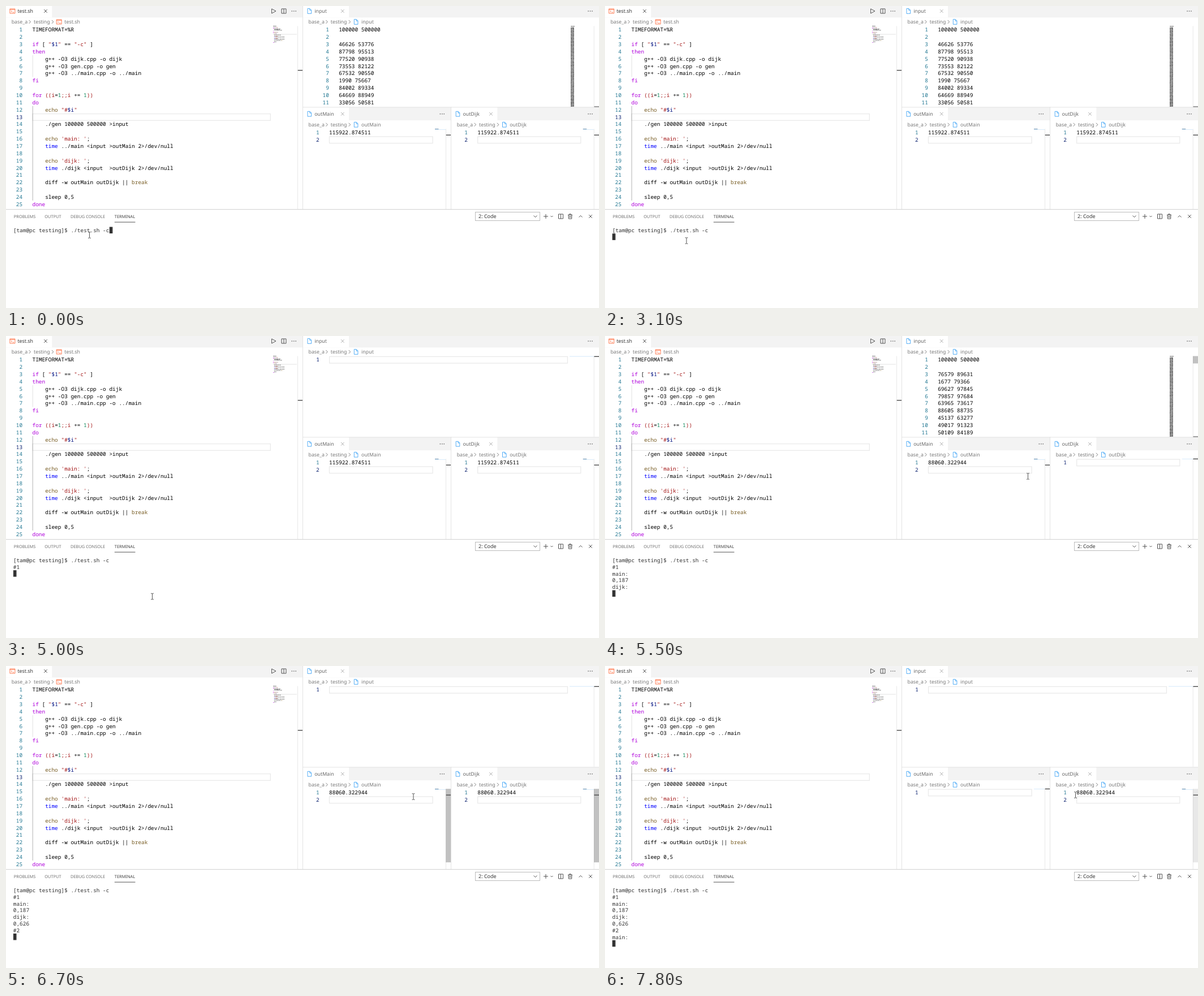
An HTML page with a canvas for the animation above (8000 ms loop, 1048 px wide and 534 px high).

```html
<!DOCTYPE html>
<html lang="en">
<head>
<meta charset="utf-8">
<title>Stress test in a code editor</title>
<style>
  html, body { margin: 0; width: 100%; height: 100%; overflow: hidden; background: #fff; }
  canvas { display: block; }
</style>
</head>
<body>
<canvas width="1048" height="534"></canvas>
<script>
const ctx = document.querySelector('canvas').getContext('2d');
const LOOP = 8000, FONT = 9.44, CHAR = FONT * 0.6, LINE = 12.855, ROW = 11.78;
const MAP_ROW = 1.2, MAP_CHAR = 0.46;

const script = `TIMEFORMAT=%R

if [ "$1" == "-c" ]
then
    g++ -O3 dijk.cpp -o dijk
    g++ -O3 gen.cpp -o gen
    g++ -O3 ../main.cpp -o ../main
fi

for ((i=1;;i += 1))
do
    echo "#$i"

    ./gen 100000 500000 >input

    echo 'main: ';
    time ../main <input >outMain 2>/dev/null

    echo 'dijk: ';
    time ./dijk <input  >outDijk 2>/dev/null

    diff -w outMain outDijk || break

    sleep 0,5
done`.split('\n');

const syntax = [
  ['\\b(?:if|then|fi|for|do|done)\\b', '#af00db'],
  ['\\b(?:echo|break)\\b', '#795e26'],
  ['\\btime\\b', '#0000ff'],
  ['\'[^\']*\'|"-c"|"#?|\\(\\(i|;;i|\\)\\)', '#a31515'],
  ['\\$\\w', '#001080'],
  ['1(?=[;)])', '#098658'],
  ['\\w+|\\s+|.', '#000']
];
const lexer = new RegExp(syntax.map(([pattern]) => `(${pattern})`).join('|'), 'g');

const graph = pairs => ['100000 500000', '', ...pairs.split(',')];
const firstGraph = graph('46626 53776,87798 95513,77520 90938,73553 82122,67532 90550,1990 75667,84002 89334,64669 88949,33056 50581');
const secondGraph = graph('76579 89631,1677 79366,69627 97845,79857 97684,63965 73617,88605 88735,45137 63277,49017 91323,50109 84189');
const empty = [''], firstSum = ['115922.874511', ''], secondSum = ['88060.322944', ''];

// Each timeline lists [start in ms, value...].
const inputFile = [[0, firstGraph], [4100, empty], [5200, secondGraph], [6700, empty]];
const mainFile = [[0, firstSum], [5200, empty], [5500, secondSum], [7400, empty]];
const dijkFile = [[0, firstSum], [5500, empty], [5900, secondSum]];
const inputSlider = [[0, 0], [5200, 0.4], [6200, 0]];
const mainSlider = [[0, 0], [5700, 0.4], [6200, 0], [6700, 0.4], [7400, 0]];
const dijkSlider = [[0, 0], [6200, 0.4], [6900, 0], [7000, 0.4], [7800, 0.15]];
const terminal = [
  [0, '[tam@pc testing]$ ./test.sh -c'], [4000, '#1'], [5200, 'main:'], [5200, '0,187'],
  [5200, 'dijk:'], [5900, '0,626'], [6600, '#2'], [7400, 'main:']
];
const pointer = [
  [0, 147.5, 405], [3100, 144, 415], [3200, 138.5, 420], [3400, 137, 423], [3500, 135, 426],
  [3600, 132, 430], [3700, 131, 433], [3800, 131.5, 436], [4000, 143, 439], [4100, 157.5, 437],
  [4300, 153, 435], [4400, 146, 432], [4500, 139.5, 429.5], [4700, 149, 436], [4800, 161.5, 443],
  [5000, 258.5, 460.5], [5200, 409.5, 457], [5500, 747.5, 248], [5700, 737, 228], [5800, 736, 215],
  [5900, 739.5, 206], [6200, 807.5, 225], [6400, 850.5, 226.5], [6600, 800, 229], [6700, 720, 231],
  [6900, 686.5, 232], [7000, 853.5, 231], [7200, 777, 230, 'arrow'], [7400, 718.5, 228],
  [7600, 815.5, 229.5], [7800, 831.5, 228]
];
const current = (timeline, t) => timeline.findLast(step => step[0] <= t);

const icons = {
  shell: 'M-4.5-4h9v8h-9z M-4.5-2.7h9 M-2.5-.8l1.6 1.4-1.6 1.4 M.3 2.2h2.4',
  file: 'M-3.2-4.4H.8l2.6 2.6v6.2h-6.6z M.6-4.2v2.6h2.6',
  close: 'M-2.8-2.8l5.6 5.6M2.8-2.8l-5.6 5.6',
  next: 'M-1.4-3l2.9 3-2.9 3',
  down: 'M-3-1.4l3 2.9 3-2.9',
  smallDown: 'M-2-1l2 2 2-2',
  up: 'M-3 1.5l3-2.9 3 2.9',
  plus: 'M-4 0h8M0-4v8',
  play: 'M-3.4-4l7.4 4-7.4 4z',
  split: 'M-4-4h8v8h-8zM0-4v8',
  trash: 'M-4-2.6h8M-1.4-2.8v-1.4h2.8v1.4M-3-2.6l.3 6.8h5.4l.3-6.8M-1-.8v3.2M1-.8v3.2',
  beam: 'M-2.4-5.3h1.8l.6.6.6-.6h1.8M0-4.7v9.4M-2.4 5.3h1.8l.6-.6.6.6h1.8'
};

function icon(name, x, y, color = '#424242', width = 0.9) {
  ctx.save();
  ctx.translate(x, y);
  ctx.strokeStyle = color;
  ctx.lineWidth = width;
  ctx.stroke(new Path2D(icons[name]));
  ctx.restore();
}

function box(x, y, w, h, color) {
  ctx.fillStyle = color;
  ctx.fillRect(x, y, w, h);
}

function text(s, x, y, color, font, align = 'left') {
  ctx.font = font;
  ctx.textAlign = align;
  ctx.fillStyle = color;
  ctx.fillText(s, x, y);
}
const mono = (s, x, y, color, align) => text(s, x, y + 3.4, color, `${FONT}px "Noto Sans Mono", monospace`, align);
const sans = (s, x, y, color, size = 8.8) => text(s, x, y + size * 0.355, color, `${size}px "Noto Sans", sans-serif`);

function dots(x, y) {
  for (const dx of [-3.4, 0, 3.4]) box(x + dx - 0.65, y - 0.6, 1.3, 1.3, '#424242');
}

function group(left, right, top, name, type) {
  const focused = type === 'shell', color = focused ? '#ff7043' : '#42a5f5';
  const tabY = top + 12, crumbY = top + 31;
  box(left, top, right - left, 23.4, '#f3f3f3');
  box(left, top, 81.3, 23.4, '#fff');
  icon(type, left + 11.4, tabY, color);
  sans(name, left + 20.4, tabY, focused ? '#333' : '#666');
  icon('close', left + 70, tabY, focused ? '#424242' : '#a8a8a8');
  dots(right - 15.5, tabY);
  sans('base_a', left + 9.7, crumbY, '#777');
  icon('next', left + 42, crumbY, '#777');
  sans('testing', left + 49, crumbY, '#777');
  icon('next', left + 82.3, crumbY, '#777');
  icon(type, left + 93.7, crumbY, color);
  sans(name, left + 103.3, crumbY, '#777');
}

function drawTokens(line, drawToken) {
  for (const match of line.matchAll(lexer)) {
    const kind = match.slice(1).findIndex(Boolean);
    drawToken(match[0], match.index, syntax[kind][1]);
  }
}

function editor({ textX, top, lines, active, boxEnd, right, markY, colored }) {
  if (active) {
    ctx.strokeStyle = '#eaeaea';
    ctx.lineWidth = 1.3;
    ctx.strokeRect(textX + 0.4, top + (active - 1) * LINE + 0.9, boxEnd - textX, LINE - 1.2);
  }
  lines.forEach((line, i) => {
    const y = top + (i + 0.5) * LINE;
    mono(i + 1, textX - 17.4, y, i + 1 === active ? '#0b216f' : '#237893', 'right');
    if (colored) drawTokens(line, (s, col, color) => mono(s, textX + col * CHAR, y, color));
    else mono(line, textX, y, '#000');
  });
  const bottom = top < 100 && right > 1000 ? 178.5 : 359;
  box(right - 9.2, top, 0.7, bottom - top, '#dedede');
}
const mark = (right, y) => box(right - 8.6, y - 0.7, 8.6, 1.4, '#4a4a4a');

function slider(right, top, height, alpha) {
  box(right - 9, top, 9, height, `rgba(100,100,100,${alpha})`);
}

function scriptEditor() {
  group(0, 524.3, -3, 'test.sh', 'shell');
  icon('play', 473, 9);
  icon('split', 491, 9);
  box(46.8, 35.5 + 4 * LINE, 0.7, 3 * LINE, '#d3d3d3');
  editor({ textX: 46.5, top: 35.5, lines: script, active: 13, boxEnd: 467, right: 524.3, colored: true });
  box(46.8, 35.5 + 11 * LINE, 0.7, 13 * LINE, '#939393');
  box(472, 49.6, 42, 0.9, '#e2e2e2');
  script.forEach((line, row) => drawTokens(line, (s, col, color) => {
    ctx.globalAlpha = 0.65;
    if (s.trim()) box(472 + col * MAP_CHAR, 35.3 + row * MAP_ROW, s.length * MAP_CHAR, 0.8, color);
    ctx.globalAlpha = 1;
  }));
  mark(524.3, 113.7);
}

function graphMap() {
  for (let row = 0; row < 119; row++) {
    if (row === 1) continue;
    for (let col = 0; col < (row ? 11 : 13); col++) {
      const noise = Math.abs(Math.sin(row * 12.9898 + col * 78.233) * 43758.5453) % 1;
      const alpha = row && col === 5 ? 0.25 : 0.45 + noise * 0.45;
      box(998 + col * 0.54, 35.4 + row * MAP_ROW, 0.54, 1.05, `rgba(0,0,0,${alpha})`);
    }
  }
}

function inputEditor(t) {
  const lines = current(inputFile, t)[1], blank = lines === empty;
  group(524.8, 1048, -3, 'input', 'file');
  editor({ textX: blank ? 571.2 : 588.2, top: 35.5, lines, active: blank ? 1 : 0, boxEnd: 992, right: 1048 });
  if (blank) box(996, 35.6, 43, 0.9, '#cfe6fa');
  else graphMap();
  slider(1048, 35.5, 13, current(inputSlider, t)[1]);
  mark(1048, blank ? 36.3 : 178.2);
}

function sumEditor(left, right, name, file, sliderTimes, t) {
  const lines = current(file, t)[1], blank = lines === empty, top = 217.2, mapX = right - 28.3;
  group(left, right, 178.8, name, 'file');
  editor({ textX: left + 46.3, top, lines, active: lines.length, boxEnd: right - 32.6, right });
  box(mapX, blank ? 217 : 218.2, 19, 0.8, '#cfe6fa');
  if (!blank) box(mapX, 217, 6.5, 0.9, '#5f87a8');
  slider(right, top, 130, current(sliderTimes, t)[1]);
  mark(right, blank ? 217.4 : 228.2);
}

function panel(t) {
  sans('PROBLEMS', 13.8, 372, '#717171', 7.44);
  sans('OUTPUT', 68.3, 372, '#717171', 7.44);
  sans('DEBUG CONSOLE', 114, 372, '#717171', 7.44);
  sans('TERMINAL', 191.8, 372, '#424242', 7.44);
  box(191.8, 381.7, 36.7, 0.9, '#424242');
  ctx.strokeStyle = '#b5b5b5';
  ctx.lineWidth = 0.9;
  ctx.strokeRect(829.5, 364.5, 114, 15);
  sans('2: Code', 835, 372, '#333', 9);
  icon('down', 935.5, 372);
  icon('plus', 954, 372);
  icon('smallDown', 964.5, 372);
  icon('split', 980.5, 372);
  icon('trash', 997, 372);
  icon('up', 1015.5, 372);
  icon('close', 1033, 372);

  const printed = terminal.filter(step => step[0] <= t);
  printed.forEach(([, line], row) => mono(line, 12.8, 396.7 + row * ROW, '#333'));
  const typing = t < 700;
  box(12.9 + (typing ? 30 * CHAR : 0), 390.6 + (typing ? 0 : printed.length) * ROW, 5.6, 11.5, '#333');
}

function drawPointer(t) {
  const [, x, y, shape] = current(pointer, t);
  if (shape !== 'arrow') return icon('beam', x, y, '#333', 0.85);
  ctx.save();
  ctx.translate(x, y);
  const arrow = new Path2D('M0 0l5.6 5.4-2.4.2 1.4 3-1.5.7-1.4-3L0 8z');
  ctx.strokeStyle = '#eee';
  ctx.lineWidth = 0.8;
  ctx.fillStyle = '#222';
  ctx.fill(arrow);
  ctx.stroke(arrow);
  ctx.restore();
}

function draw(now) {
  const t = now % LOOP;
  ctx.textRendering = 'geometricPrecision';
  box(0, 0, 1048, 534, '#fff');
  scriptEditor();
  inputEditor(t);
  sumEditor(524.8, 786.3, 'outMain', mainFile, mainSlider, t);
  sumEditor(787, 1048, 'outDijk', dijkFile, dijkSlider, t);
  box(524.2, 0, 0.8, 359.5, '#dcdcdc');
  box(524.2, 178.6, 524, 0.8, '#dcdcdc');
  box(786.2, 178.6, 0.8, 181, '#dcdcdc');
  box(0, 359.3, 1048, 0.9, '#c8c8c8');
  panel(t);
  drawPointer(t);
}

const start = performance.now();
function tick() {
  draw(performance.now() - start);
  requestAnimationFrame(tick);
}
tick();
</script>
</body>
</html>
```
